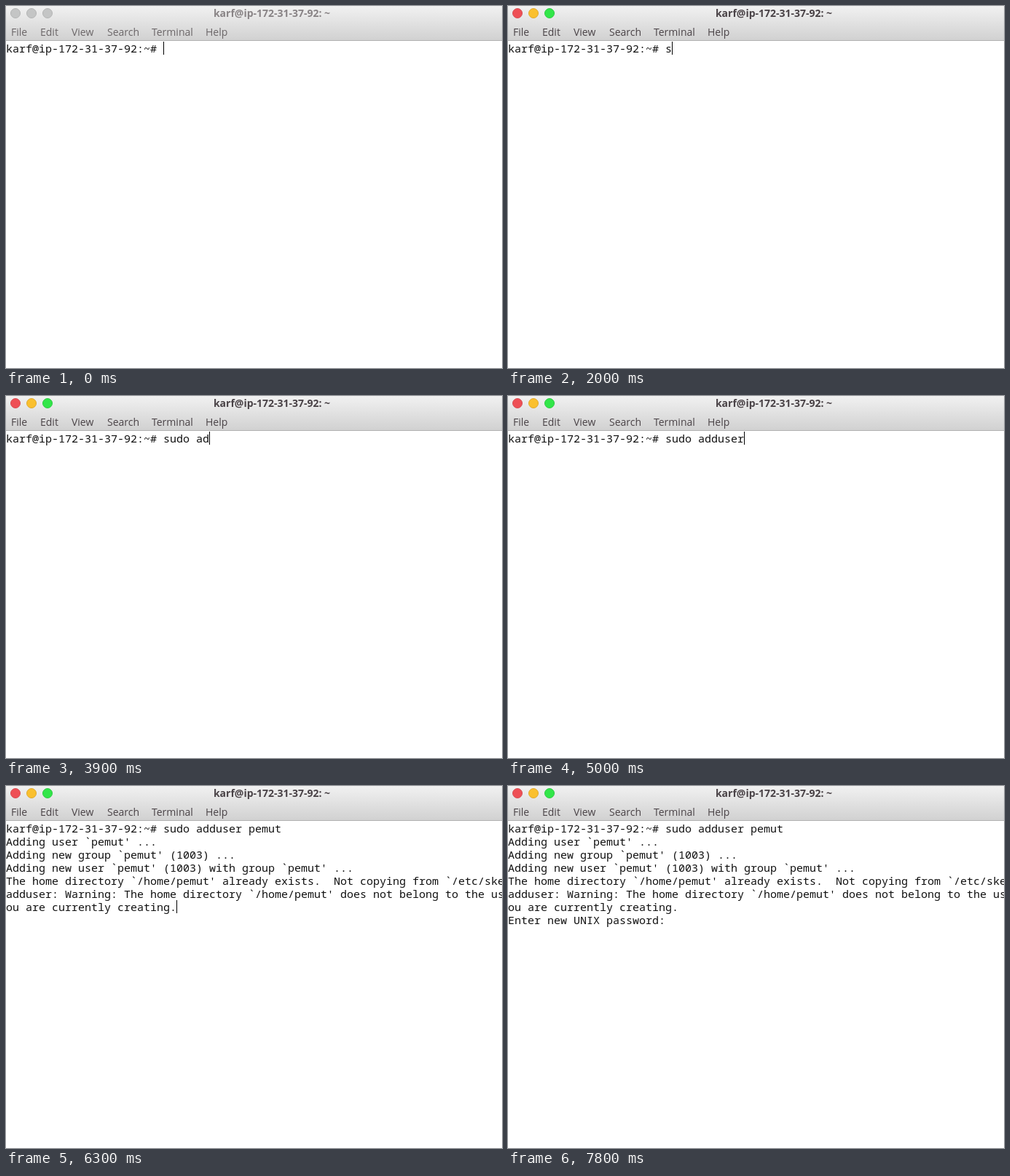
These frames come from a looping animation (681 px wide and 498 px high, 8 s). An HTML page:

```html
<!DOCTYPE html>
<html lang="en">
<head>
<meta charset="utf-8">
<title>Terminal</title>
<style>
  html, body { margin: 0; width: 100%; height: 100%; overflow: hidden; background: #fff; }
  svg { display: block; }
  text { white-space: pre; }
  #bar { font: 14px "Open Sans", "Noto Sans", sans-serif; fill: #6b6668; }
  #bar .title { font-weight: bold; fill: #898486; text-anchor: middle; }
  #bar circle { fill: #c4c5c5; stroke: #b3b4b4; }
  #bar.active, #bar.active .title { fill: #4a4347; }
  #bar.active .close { fill: #ee5056; stroke: #d94a50; }
  #bar.active .min { fill: #fac02f; stroke: #e0a92c; }
  #bar.active .max { fill: #32e649; stroke: #2bcb40; }
  #screen { font: 15px "Noto Sans Mono", "DejaVu Sans Mono", monospace; fill: #111; }
</style>
</head>
<body>
<svg width="681" height="498" viewBox="0 0 681 498">
  <defs>
    <linearGradient id="metal" x2="0" y2="1">
      <stop stop-color="#f1f1f1"/>
      <stop offset="1" stop-color="#d1d1d1"/>
    </linearGradient>
  </defs>
  <rect width="681" height="47" fill="url(#metal)"/>
  <rect y="47" width="681" height="1" fill="#b1b1b1"/>
  <g id="bar">
    <circle class="close" cx="13" cy="10" r="6.5"/>
    <circle class="min" cx="35" cy="10" r="6.5"/>
    <circle class="max" cx="57" cy="10" r="6.5"/>
    <text class="title" x="365" y="15">karf@ip-172-31-37-92: ~</text>
    <text y="41"><tspan x="7">File</tspan><tspan x="47">Edit</tspan><tspan x="90">View</tspan><tspan x="139">Search</tspan><tspan x="200">Terminal</tspan><tspan x="274">Help</tspan></text>
  </g>
  <g id="screen"></g>
  <rect id="caret" width="1" height="18"/>
  <path id="pointer" d="M-4 -8H-1L0 -7L1 -8H4M0 -7V7M-4 8H-1L0 7L1 8H4" fill="none" stroke="#222"/>
</svg>
<script>
const LOOP = 8000, CELL = 9, ROW = 18, TOP = 49;
const $ = id => document.getElementById(id);

const prompt = "karf@ip-172-31-37-92:~# ";
const command = "sudo adduser pemut";
const keyTimes = [2000, 2200, 2300, 2500, 3000, 3900, 3900, 4000, 4100, 4200,
                  4600, 5000, 5400, 5500, 5600, 5700, 5900, 6200];
const output = [
  "Adding user `pemut' ...",
  "Adding new group `pemut' (1003) ...",
  "Adding new user `pemut' (1003) with group `pemut' ...",
  "The home directory `/home/pemut' already exists.  Not copying from `/etc/skel'.",
  "adduser: Warning: The home directory `/home/pemut' does not belong to the user y",
  "ou are currently creating."
];
const question = "Enter new UNIX password: ";

// Intervals in which the caret is blinked off
const caretOff = [[1500, 1800], [6700, 7200], [7800, LOOP]];
// Pointer positions: start time, x, y
const pointerStops = [[600, 54.5, 175.5], [700, 361.5, 114.5], [900, 356.5, 108.5]];

const rows = Array.from({ length: output.length + 2 }, (_, i) => {
  const row = document.createElementNS("http://www.w3.org/2000/svg", "text");
  row.setAttribute("y", TOP + i * ROW + 15);
  return $("screen").appendChild(row);
});

function linesAt(t) {
  const typed = keyTimes.filter(time => time <= t).length;
  const lines = [prompt + command.slice(0, typed)];
  if (t >= 6300) lines.push(...output);
  else if (t >= 6200) lines.push("");
  if (t >= 6400) lines.push(question);
  return lines;
}

function render(t) {
  const lines = linesAt(t), last = lines.length - 1;
  rows.forEach((row, i) => {
    const line = lines[i] || "";
    if (row.textContent !== line) row.textContent = line;
  });

  $("caret").setAttribute("x", lines[last].length * CELL);
  $("caret").setAttribute("y", TOP + last * ROW);
  const hidden = caretOff.some(([from, to]) => t >= from && t < to);
  $("caret").style.visibility = hidden ? "hidden" : "visible";

  $("bar").classList.toggle("active", t >= 900);

  const stop = t < 1800 && pointerStops.filter(([time]) => time <= t).pop();
  $("pointer").style.visibility = stop ? "visible" : "hidden";
  if (stop) $("pointer").setAttribute("transform", `translate(${stop[1]} ${stop[2]})`);
}

const start = performance.now();
function tick() {
  render((performance.now() - start) % LOOP);
  requestAnimationFrame(tick);
}
tick();
</script>
</body>
</html>
```
